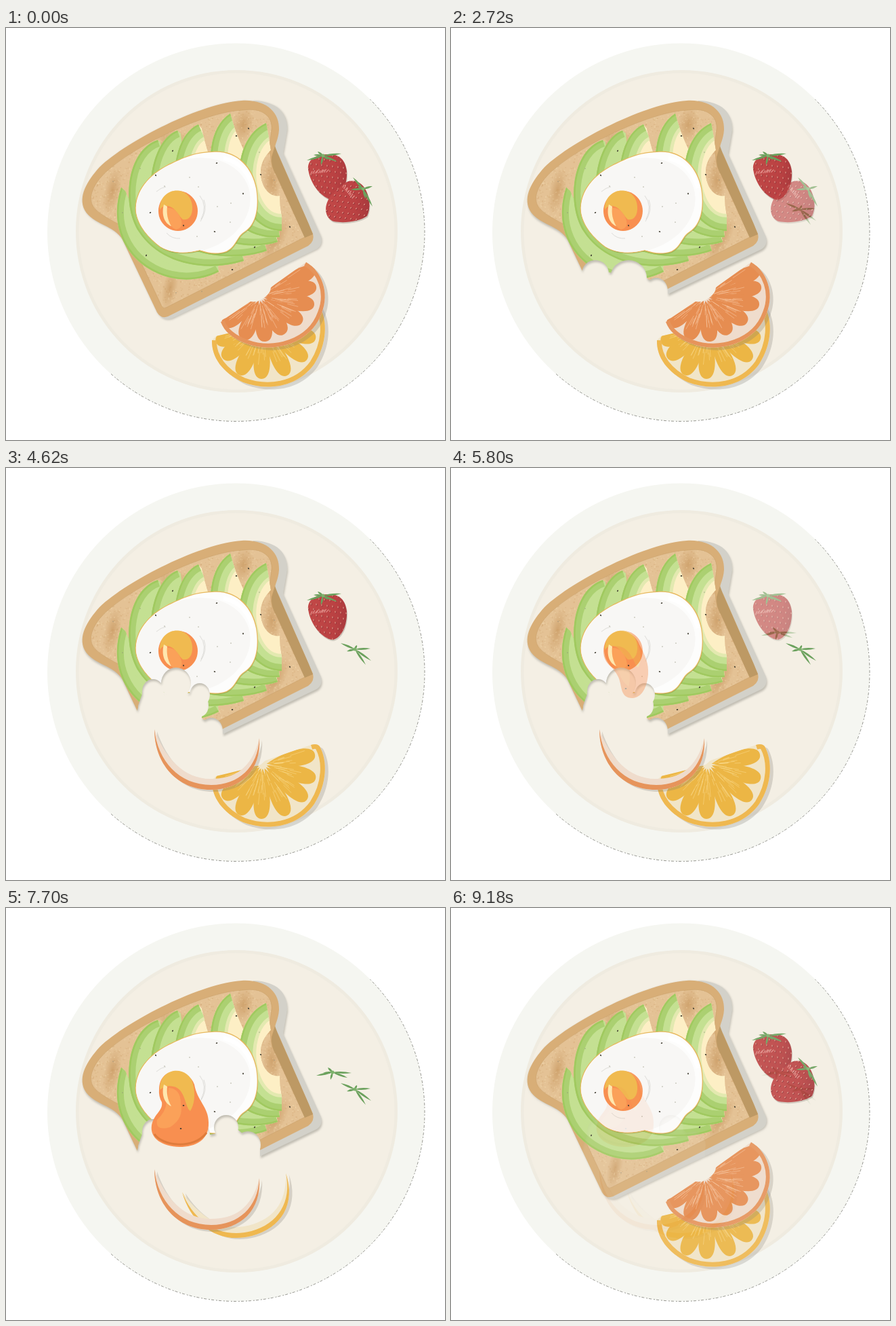
Animation of 648 by 607 pixels, one loop 9240 ms. Source, as an HTML page with a canvas:

```html
<!DOCTYPE html>
<html lang="en">
<head>
<meta charset="utf-8">
<title>Breakfast plate</title>
<style>
html, body { margin: 0; width: 100%; height: 100%; overflow: hidden; background: #fff; }
canvas { display: block; }
</style>
</head>
<body>
<canvas id="stage" width="648" height="607"></canvas>
<script>
const W = 648, H = 607;
const HOLD = 1000, STEP = 60, STEPS = 10, STATES = 6;
const PERIOD = HOLD + STEP * (STEPS - 1);
const LOOP = PERIOD * STATES;

let seed = 7;
const rnd = () => (seed = (seed * 16807) % 2147483647) / 2147483647;
const span = (a, b) => a + (b - a) * rnd();

function layer() {
  const c = document.createElement('canvas');
  c.width = W;
  c.height = H;
  return c.getContext('2d');
}

function fill(g, d, color) {
  g.fillStyle = color;
  g.fill(d instanceof Path2D ? d : new Path2D(d));
}

function line(g, d, color, width) {
  g.strokeStyle = color;
  g.lineWidth = width;
  g.stroke(d instanceof Path2D ? d : new Path2D(d));
}

function oval(g, x, y, rx, ry, color, turn = 0) {
  g.fillStyle = color;
  g.beginPath();
  g.ellipse(x, y, rx, ry, turn, 0, 7);
  g.fill();
}

function inside(g, d, paint) {
  g.save();
  g.clip(new Path2D(d));
  paint();
  g.restore();
}

function plate(g) {
  g.fillStyle = '#fff';
  g.fillRect(0, 0, W, H);
  oval(g, 339.5, 301, 278.5, 278.5, '#f5f6f1');
  oval(g, 340.5, 299.5, 237.5, 237.5, '#efebe0');
  oval(g, 340.5, 299.5, 233, 233, '#f4efe4');
  g.save();
  g.setLineDash([2, 3, 4, 2]);
  g.strokeStyle = 'rgba(60,60,50,.75)';
  g.lineWidth = 0.7;
  g.beginPath();
  g.arc(339.5, 301, 278.5, -0.78, 2.3);
  g.stroke();
  g.restore();
}

// ---- toast ----
const CRUST = 'M348 107C385 105 404 125 403 150C402 165 397 170 397 178L402 186L453 303Q456 314 446 321' +
  'L239 425Q229 429 223 419L172 312C160 290 128 290 116 268C106 248 120 225 138 205C180 165 290 110 348 107Z';
const CRUMB = 'M350 121C378 117 394 130 392 150C390 165 387 178 393 204L441 308L236 412Q232 414 230 410' +
  'L178 300C168 285 140 280 128 262C120 245 133 225 150 210C195 170 300 122 350 121Z';
const CAST = 'M365 107C400 108 416 125 415 150Q412 168 409 185L465 308Q468 320 458 326' +
  'L245 428Q235 431 228 425L300 300Z';

function bread(g) {
  fill(g, CAST, '#d3d1c9');
  fill(g, CRUST, '#d8ae77');
  fill(g, CRUMB, '#e4c295');
  inside(g, CRUMB, () => {
    const toasted = [[157, 240, 12, 36, 0.2], [242, 384, 11, 32, 0.2], [397, 312, 14, 38, 0.5],
      [350, 143, 16, 26, 0.2], [392, 225, 14, 36, 0], [245, 165, 25, 15, 0]];
    for (const [x, y, rx, ry, turn] of toasted) {
      g.save();
      g.translate(x, y);
      g.rotate(turn);
      g.scale(rx, ry);
      const glow = g.createRadialGradient(0, 0, 0, 0, 0, 1);
      glow.addColorStop(0, 'rgba(188,134,73,.5)');
      glow.addColorStop(1, 'rgba(188,134,73,0)');
      g.fillStyle = glow;
      g.fillRect(-1, -1, 2, 2);
      g.restore();
    }
    for (let i = 0; i < 5200; i++) {
      g.fillStyle = i % 2 ? 'rgba(246,220,180,.3)' : 'rgba(196,144,88,.2)';
      g.fillRect(span(115, 450), span(110, 420), span(1, 2.5), span(1, 2.5));
    }
  });
  line(g, CRUMB, 'rgba(190,146,90,.35)', 1);
  fill(g, 'M397 174L392 190Q391 205 399 217L441 309L453 304L447 289L402 187Z', '#bd9964');
}

// ---- avocado: outer edge, rest of the outline, creamy core or not ----
const SLICES = [
  ['M170 235C152 290 175 340 225 362C255 375 290 372 314 359', 'L313 347C260 350 200 300 176 240Z', 0],
  ['M224 165C178 180 170 260 196 300C225 345 290 362 351 343', 'L350 333C300 330 240 290 228 168Z', 0],
  ['M253 151C215 165 205 240 220 280C250 340 340 345 385 328', 'L382 317C320 300 270 260 258 155Z', 0],
  ['M284 142C255 155 245 200 250 240C270 310 350 332 401 315', 'L399 303C340 290 305 220 289 148Z', 1],
  ['M331 126C300 145 295 200 310 240C330 290 365 312 404 308', 'L403 295C375 280 360 200 352 182Q337 150 331 126Z', 1],
  ['M384 140C350 155 340 200 346 235C355 280 380 299 407 299',
    'L407 277Q404 262 404 247C388 250 375 232 376 210C377 195 386 185 391 180Q388 160 384 140Z', 1]
];

function avocado(g) {
  for (const [edge, rest, creamy] of SLICES) {
    inside(g, edge + rest, () => {
      fill(g, edge + rest, creamy ? '#fdefc5' : '#c4e092');
      if (creamy) line(g, edge, '#e3e9b0', 50);
      line(g, edge, '#c4e092', 40);
      line(g, edge, '#abd071', 20);
      line(g, edge, '#a0c95f', 5);
    });
  }
}

// ---- egg ----
const WHITE = 'M305 183C340 180 363 205 369 236C374 266 368 290 352 300C340 307 340 322 325 329' +
  'C310 334 298 331 286 327C270 331 248 334 228 322C211 309 195 292 192 270C190 240 212 216 240 202C262 192 275 184 305 183Z';

function white(g) {
  g.save();
  g.translate(1, 2);
  fill(g, WHITE, 'rgba(90,120,40,.35)');
  g.restore();
  line(g, WHITE, '#e7b75c', 2.5);
  fill(g, WHITE, '#fdfdfc');
  inside(g, WHITE, () => oval(g, 276, 261, 86, 68, '#f8f7f5', -0.3));
  line(g, 'M321 192C345 197 358 212 364 236', '#fff', 6);
  line(g, 'M286 247Q298 262 288 282M292 253Q298 268 287 285M237 302Q245 311 257 310M222 241Q229 235 236 234',
    'rgba(205,203,198,.6)', 1);
}

const YOLKS = {
  whole: {
    body: 'M254 240A29 29.5 0 1 1 253.9 240Z',
    gold: 'M227 264C230 232 273 231 275 263C276 278 268 284 261 282C255 277 250 263 237 262Q230 262 227 268Z',
    soft: 'M238 265Q251 264 258 281Q263 294 251 297Q237 292 238 265Z'
  },
  drip: {
    body: 'M226 266C228 232 269 235 278 260C287 277 292 288 291 304C289 325 281 338 268 339C249 339 253 321 247 308C241 294 226 288 226 266Z',
    gold: 'M227 264C230 232 268 234 276 259C281 274 281 286 276 294C270 290 267 267 249 263Q236 260 227 268Z',
    soft: 'M239 265Q254 264 259 284Q267 306 262 322Q252 315 248 301Q235 289 239 265Z'
  },
  pool: {
    body: 'M226 266C228 232 269 235 278 260C282 284 299 293 299 316C300 342 280 352 256 352C231 351 212 340 215 320C219 302 232 299 230 286Q225 278 226 266Z',
    gold: 'M227 264C230 232 270 233 276 259C280 275 278 290 272 299C264 294 265 266 247 263Q236 260 227 268Z',
    soft: 'M240 265Q258 266 258 288Q263 310 242 323Q220 329 223 312Q236 300 237 286Z'
  }
};

function yolk(g, kind) {
  const { body, gold, soft } = YOLKS[kind];
  fill(g, body, '#f88f50');
  fill(g, soft, '#fba159');
  fill(g, gold, '#f0ba50');
  if (kind === 'pool') line(g, 'M219 333C230 350 277 357 296 331', '#df7c3c', 3);
  fill(g, 'M233 260C229 275 234 288 244 292C238 282 237 272 238 263Z', '#ffe7ae');
}

const SPECKS = [340, 159, 246, 181, 221, 217, 311, 199, 350, 244, 376, 216, 213, 272, 262, 291, 308, 300,
  367, 323, 419, 293, 334, 356, 207, 335, 358, 148];
const DUST = [158, 226, 198, 207, 271, 220, 284, 234, 234, 233, 332, 258, 312, 263, 282, 307, 331, 286, 374, 183,
  172, 272, 251, 390, 289, 388, 396, 224];

function pepper(g) {
  for (let i = 0; i < SPECKS.length; i += 2) oval(g, SPECKS[i], SPECKS[i + 1], 1.3, 0.9, '#403c30', i);
  for (let i = 0; i < DUST.length; i += 2) oval(g, DUST[i], DUST[i + 1], 0.8, 0.6, '#8d8a78');
}

// ---- bites: scallops [x, y, rx, ry] and the area below them ----
const BITES = [
  { from: 1, area: 'M185 358L233 360L288 368L320 390L320 445L185 445Z',
    arcs: [[213, 362, 20, 20], [262, 368, 27, 26], [303, 387, 17, 19]] },
  { from: 3, area: 'M202 330L290 332L297 352L288 368L288 385L195 385L195 350Z',
    arcs: [[217, 329, 16, 18], [251, 317, 22, 23], [286, 334, 15, 17], [287, 350, 12, 16]] },
  { from: 5, area: 'M297 335L340 325L375 352L375 405L285 405L285 350Z',
    arcs: [[325, 323, 18, 18], [357, 349, 19, 20]] }
];

function toast(g, k) {
  const t = layer();
  seed = 7;
  bread(t);
  avocado(t);
  white(t);
  if (k < 4) yolk(t, 'whole');
  pepper(t);
  t.globalCompositeOperation = 'destination-out';
  for (const { from, area, arcs } of BITES) {
    if (k < from) continue;
    fill(t, area, '#000');
    arcs.forEach(a => oval(t, ...a, '#000'));
  }
  g.save();
  g.shadowColor = 'rgba(120,118,108,.4)';
  g.shadowBlur = 3;
  g.shadowOffsetX = 1;
  g.shadowOffsetY = k ? 3 : 1;
  g.drawImage(t.canvas, 0, 0);
  g.restore();
  if (k >= 4) {
    yolk(g, k > 4 ? 'pool' : 'drip');
    oval(g, 258, 325, 1.3, 0.9, '#403c30');
    oval(g, 262, 291, 1.3, 0.9, '#403c30');
  }
}

// ---- citrus ----
const GRAPEFRUIT = {
  edge: 'M443 345C466 358 478 390 466 420C450 465 395 480 355 465C335 458 322 447 317 433',
  rest: 'Q318 430 325 427L361 403Q372 405 381 397Q391 391 391 382Z',
  core: [375, 396], peel: '#e6945b', pith: '#efdccc', flesh: '#e68d51', thread: 'rgba(250,205,170,.6)', rim: 12,
  ends: [456, 355, 458, 381, 455, 408, 437, 434, 411, 451, 383, 462, 350, 459, 321, 438]
};
const LEMON = {
  edge: 'M450 408Q459 405 463 410C475 432 474 465 455 495C430 530 385 535 350 522C320 508 303 485 304 460',
  rest: 'L310 454Q345 446 376 437L383 431Z',
  core: [379, 437], peel: '#efb850', pith: '#f1e5c8', flesh: '#ecb645', thread: 'rgba(250,220,145,.6)', rim: 14,
  ends: [456, 422, 457, 458, 444, 489, 415, 512, 377, 517, 344, 511, 320, 487, 310, 463]
};

function segment(g, [x, y], ex, ey, f) {
  const len = Math.hypot(ex - x, ey - y), w = 15;
  g.save();
  g.translate(x, y);
  g.rotate(Math.atan2(ey - y, ex - x));
  const s = new Path2D(`M6 0C${len / 2} ${-w} ${len} ${-w * 1.15} ${len} 0C${len} ${w * 1.15} ${len / 2} ${w} 6 0Z`);
  fill(g, s, f.flesh);
  g.clip(s);
  for (let i = 0; i < 11; i++) {
    const a = span(8, len * 0.55), b = a + span(8, 24), tilt = span(-0.16, 0.16);
    line(g, `M${a} ${a * tilt}L${b} ${b * tilt}`, f.thread, 0.8);
  }
  g.restore();
}

function citrus(g, f) {
  const shape = f.edge + f.rest;
  seed = 31;
  g.save();
  g.translate(5, 4);
  fill(g, shape, 'rgba(120,118,108,.25)');
  g.restore();
  fill(g, shape, f.pith);
  inside(g, shape, () => {
    for (let i = 0; i < f.ends.length; i += 2) segment(g, f.core, f.ends[i], f.ends[i + 1], f);
    line(g, f.edge, f.peel, f.rim);
  });
}

function peel(g, x, y, turn, f) {
  const outer = 'M-78-10C-78 40-45 79 5 79C50 79 80 50 77 3';
  g.save();
  g.translate(x, y);
  g.rotate(turn);
  g.save();
  g.translate(4, 3);
  fill(g, outer + 'C72 45 40 66 5 66C-35 66-65 30-78-10Z', 'rgba(120,118,108,.25)');
  g.restore();
  fill(g, outer + 'C66 48 40 63 5 63C-35 63-62 32-78-10Z', f.pith);
  fill(g, outer + 'C75 46 46 72 6 72C-42 72-73 36-78-10Z', f.peel);
  g.restore();
}

// ---- strawberries ----
function leaves(g, x, y, tips, color = '#6ba15d') {
  for (let i = 0; i < tips.length; i += 2) {
    const dx = tips[i], dy = tips[i + 1], n = 3 / Math.hypot(dx, dy);
    const mx = x + dx * 0.45, my = y + dy * 0.45;
    fill(g, `M${x} ${y}Q${mx - dy * n} ${my + dx * n} ${x + dx} ${y + dy}Q${mx + dy * n} ${my - dx * n} ${x} ${y}Z`, color);
  }
  oval(g, x, y, 2.5, 2.5, '#7db26c');
}

function berry(g, d, x, y, turn, shine) {
  g.save();
  g.translate(1, 2);
  fill(g, d, 'rgba(120,110,100,.3)');
  g.restore();
  const tone = g.createLinearGradient(x - 28, y, x + 32, y + 8);
  tone.addColorStop(0, '#c14847');
  tone.addColorStop(0.65, '#ba4142');
  tone.addColorStop(1, '#a6393c');
  fill(g, d, tone);
  inside(g, d, () => {
    for (let r = -4; r < 5; r++) {
      for (let c = -4; c < 5; c++) {
        const px = x + c * 8 + (r & 1) * 4, py = y + r * 8 + c;
        oval(g, px + 0.7, py + 0.6, 1.1, 1.8, '#963238', turn);
        oval(g, px, py, 0.8, 1.5, '#dc8a7c', turn);
      }
    }
    for (let i = 0; i < 9; i++) {
      const [sx, sy, dx, dy] = shine;
      const px = sx + dx * i, py = sy + dy * i;
      line(g, `M${px} ${py}l${2 + i % 3} ${-4 - i % 2}`, 'rgba(238,165,158,.75)', 1.3);
    }
  });
}

function berries(g, k) {
  if (k < 4) {
    berry(g, 'M446 208C445 195 455 187 474 186C491 185 501 193 503 211C504 232 495 251 482 253C466 251 449 230 446 208Z',
      474, 219, -0.1, [450, 215, 2.8, -0.3]);
    leaves(g, 468, 188, [-24, 7, -8, -6, 27, -3, 21, 9, -3, 14, 8, 6, -14, -1]);
  } else {
    leaves(g, 482, 242, [-24, 5, -7, -7, 28, 1, 22, 8, -3, 11, -14, 1]);
  }
  if (k < 2) {
    berry(g, 'M497 231C506 222 521 224 529 235C537 248 539 265 533 277C522 285 500 288 484 285C472 281 470 267 474 257C478 246 489 239 497 231Z',
      505, 257, 0.7, [497, 235, 1.7, 2]);
    leaves(g, 527, 237, [-15, -17, 14, -4, 14, 26, 4, 15, -18, 1, -8, -4]);
  } else {
    leaves(g, 515, 267, [-21, -9, 23, -1, 24, 17, 16, 23, -12, 3, 3, -6]);
  }
}

function scene(k) {
  const g = layer();
  plate(g);
  if (k < 5) citrus(g, LEMON);
  else peel(g, 338, 408, -0.26, LEMON);
  if (k < 3) citrus(g, GRAPEFRUIT);
  else peel(g, 297, 395, 0, GRAPEFRUIT);
  toast(g, k);
  berries(g, k);
  return g.canvas;
}

const scenes = Array.from({ length: STATES }, (_, k) => scene(k));
const stage = document.getElementById('stage').getContext('2d');
const start = performance.now();

function render(now) {
  const t = Math.max(0, now - start) % LOOP;
  const k = Math.floor(t / PERIOD), rest = t - k * PERIOD;
  // after the first loop-around, the last fade step lands on the next hold
  const mix = rest < HOLD ? 0 : Math.min(1, (Math.floor((rest - HOLD) / STEP) + 1) / STEPS);
  stage.globalAlpha = 1;
  stage.drawImage(scenes[k], 0, 0);
  if (mix) {
    stage.globalAlpha = mix;
    stage.drawImage(scenes[(k + 1) % STATES], 0, 0);
  }
  requestAnimationFrame(render);
}
render(start);
</script>
</body>
</html>
```
